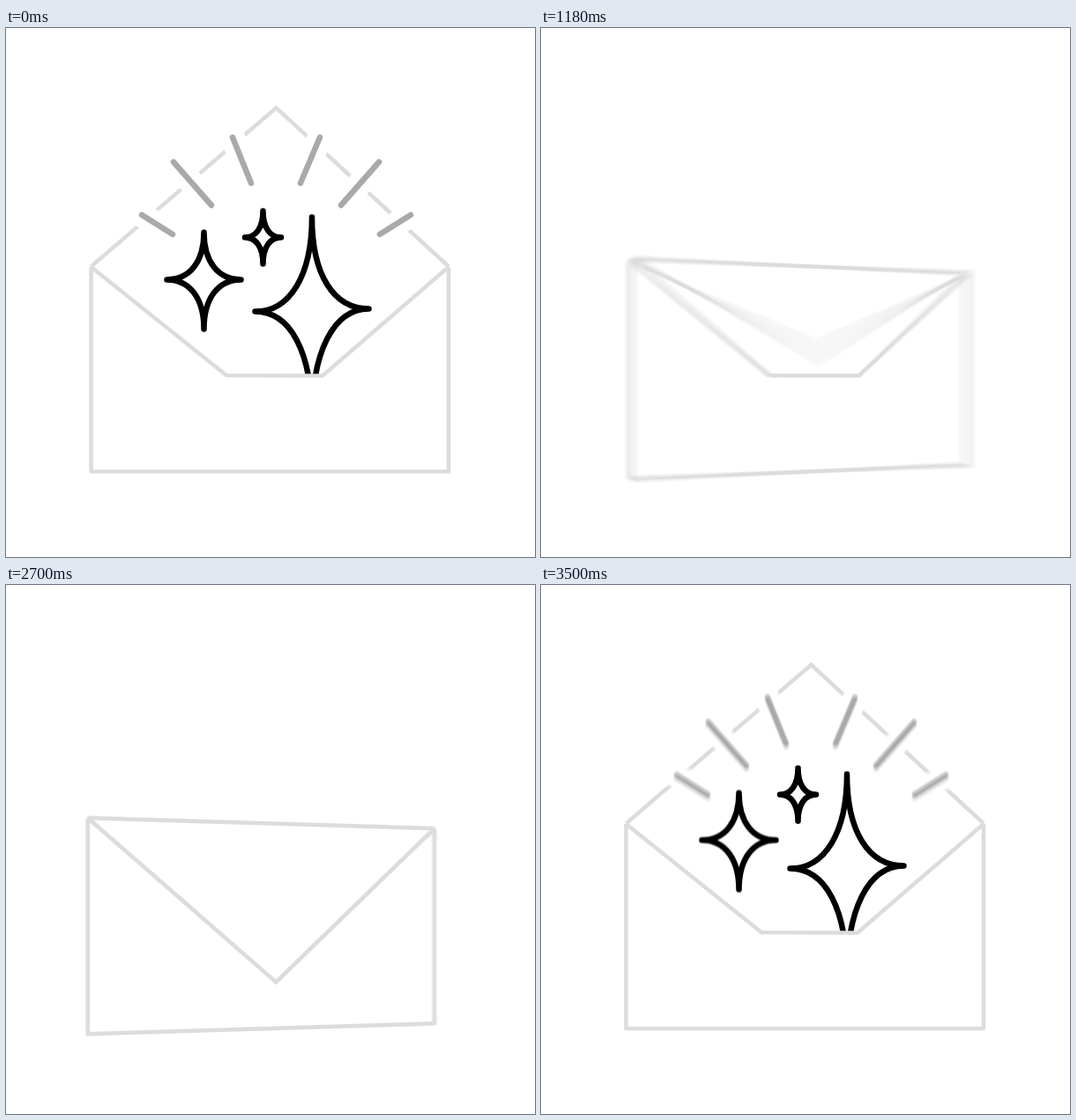
An HTML page with a canvas for the animation above (3.53 s loop, 600 by 600 pixels).

```html
<!DOCTYPE html>
<html lang="en">
<head>
<meta charset="utf-8">
<title>Envelope</title>
<style>
  html, body { margin: 0; width: 100%; height: 100%; overflow: hidden; background: #fff; }
  canvas { display: block; width: 600px; height: 600px; }
</style>
</head>
<body>
<canvas id="stage" width="600" height="600"></canvas>
<script>
const LOOP = 3530, SIZE = 600, SHUTTER = 15, SAMPLES = 10;
const GREY = '#dcdcdc', RAY = '#a9a9a9';
const DEPTH = 1020, EYE = { x: 300, y: 387 };
const FLAP = { hinge: 270.5, length: 180, tip: 306.5 };
const POCKET = [[96.5, 271], [250, 394], [359, 394.5], [502, 271]];
const RAYS = [
  [257, 124, 278, 176], [356, 124, 334, 176],
  [190, 152, 233, 201], [423, 152, 380, 201],
  [154, 212, 189, 234], [459, 212, 424, 234]
];
const STARS = [
  { x: 224.5, y: 282.5, w: 42, up: 53.5, down: 56, tilt: 0, pulse: .1, rise: [3205, 3622] },
  { x: 291.5, y: 237.5, w: 20.5, up: 30, down: 30, tilt: 0, pulse: .08, rise: [3200, 3530] },
  { x: 347, y: 320, w: 64.5, up: 105.5, down: 124, tilt: 1.6, pulse: .05, rise: [3180, 3510] }
];
const RAY_RISE = [3420, 3528], DROP = [760, 960], TRAVEL = 280;
const WORD = 'M171 391C169 410 172 424 184 424C200 424 210 408 213 391' +
  'C216 412 218 435 215 453C212 468 205 470 199 469C188 468 184 455 192 442' +
  'C203 427 228 415 240 404C244 394 250 390 258 390C272 390 279 398 279 411' +
  'C279 425 271 433 258 433C246 433 238 426 238 413C238 402 243 396 246 398' +
  'C252 412 270 414 284 406C293 401 299 396 303 391C299 412 299 434 314 434' +
  'C332 434 343 412 346 391C343 412 345 433 360 434';

const wordPath = new Path2D(WORD);
const ruler = document.createElementNS('http://www.w3.org/2000/svg', 'path');
ruler.setAttribute('d', WORD);
const wordLength = ruler.getTotalLength();

const out = document.getElementById('stage').getContext('2d');
const layer = document.createElement('canvas');
layer.width = layer.height = SIZE;
const c = layer.getContext('2d');
c.miterLimit = 2;

const ramp = (t, from, to) => Math.min(1, Math.max(0, (t - from) / (to - from)));
const sine = u => (1 - Math.cos(Math.PI * u)) / 2;
const rad = deg => deg * Math.PI / 180;

// Which side faces the viewer, its turn about the vertical axis and its sideways slide.
function pose(t) {
  if (t < 1135) return { front: false, turn: 0, slide: 0 };
  if (t < 1190) {
    const turn = .0095 * (t - 1135) ** 2;
    return { front: false, turn, slide: turn * .32 };
  }
  if (t < 2550) return { front: true, turn: -25 * (1 - ramp(t, 1190, 1500)) ** 3, slide: 0 };
  if (t < 2640) return { front: true, turn: -25 * ramp(t, 2550, 2640) ** 2, slide: 0 };
  return { front: false, turn: 25 * (1 - ramp(t, 2640, 2907)) ** 2, slide: 0 };
}

// 0 is shut, 180 is fully open.
function flapAngle(t) {
  return t < 2000 ? 180 * (1 - sine(ramp(t, 950, 1320))) : 180 * sine(ramp(t, 2800, 3300));
}

// How far a part is below its resting place; rising may settle after the loop restarts.
function shift(t, [from, to]) {
  const rising = t < 2000 ? t + LOOP : t;
  const drop = t < 2000 ? ramp(t, ...DROP) ** 2 : 0;
  return TRAVEL * ((1 - ramp(rising, from, to)) ** 3 + drop);
}

function project(turn, x, y, z = 0) {
  const a = rad(turn), dx = x - EYE.x;
  const scale = DEPTH / (DEPTH - (z * Math.cos(a) - dx * Math.sin(a)));
  return [
    EYE.x + (dx * Math.cos(a) + z * Math.sin(a)) * scale,
    EYE.y + (y - EYE.y) * scale
  ];
}

function trace(points, closed) {
  c.beginPath();
  points.forEach(p => c.lineTo(...p));
  if (closed) c.closePath();
}

function pen(color, width, cap = 'butt', join = 'miter') {
  c.strokeStyle = color;
  c.lineWidth = width;
  c.lineCap = cap;
  c.lineJoin = join;
}

// Draws a small flat part with the local slope of the turned envelope.
function placed(turn, x, y, draw) {
  const o = project(turn, x, y), h = project(turn, x + 1, y), v = project(turn, x, y + 1);
  const [a, b, d, e] = [h[0] - o[0], h[1] - o[1], v[0] - o[0], v[1] - o[1]];
  c.save();
  c.transform(a, b, d, e, o[0] - a * x - d * y, o[1] - b * x - e * y);
  draw();
  c.restore();
}

function drawStar(s, t) {
  const scale = t < 2000 ? 1 + s.pulse * Math.sin(2 * Math.PI * Math.min(t, 800) / 800) : 1;
  const { w, up, down, tilt } = s, k = .38;
  c.save();
  c.translate(s.x, s.y + shift(t, s.rise));
  c.scale(scale, scale);
  pen('#000', 6.5 / scale, 'round', 'round');
  c.beginPath();
  c.moveTo(0, -up);
  c.bezierCurveTo(0, -up * k, w * k, -tilt, w, -tilt);
  c.bezierCurveTo(w * k, -tilt, 0, down * k, 0, down);
  c.bezierCurveTo(0, down * k, -w * k, tilt, -w, tilt);
  c.bezierCurveTo(-w * k, tilt, 0, -up * k, 0, -up);
  c.closePath();
  c.stroke();
  c.restore();
}

function drawContents(t) {
  if (t > DROP[1] && t < 3180) return;
  c.save();
  trace([[0, 0], [0, 271], ...POCKET, [SIZE, 271], [SIZE, 0]], true);
  c.clip();
  const dy = shift(t, RAY_RISE);
  for (const [color, width] of [['#fff', 28], [RAY, 6.5]]) {
    pen(color, width, 'round');
    for (const [x1, y1, x2, y2] of RAYS) {
      trace([[x1, y1 + dy], [x2, y2 + dy]]);
      c.stroke();
    }
  }
  STARS.forEach(s => drawStar(s, t));
  c.restore();
}

function drawBack(t, turn) {
  const at = p => project(turn, ...p);
  const a = rad(flapAngle(t)), open = flapAngle(t) > 90;
  // The flap is flattened onto the envelope before the envelope turns.
  const tip = project(0, FLAP.tip,
    FLAP.hinge + FLAP.length * Math.cos(a), FLAP.length * Math.sin(a));
  const flap = [[96.5, FLAP.hinge], tip, [502, FLAP.hinge]].map(at);
  const drawFlap = () => {
    pen(GREY, 4.5);
    c.fillStyle = '#fff';
    trace(flap, !open);
    c.fill();
    c.stroke();
  };
  if (open) {
    drawFlap();
    drawContents(t);
  }
  pen(GREY, 4.5, 'butt', 'round');
  trace([[96.5, 271], [96.5, 503], [502, 503], [502, 271]].map(at));
  c.stroke();
  trace(POCKET.map(at));
  c.stroke();
  if (!open) drawFlap();
}

function drawFront(t, turn) {
  pen(GREY, 4.5);
  trace([[96, 271], [504, 271], [504, 503], [96, 503]].map(p => project(turn, ...p)), true);
  c.stroke();

  placed(turn, 178, 316, () => {
    c.fillStyle = '#000';
    c.fillRect(128, 305.5, 63, 4.5);
    c.fillRect(128, 321.8, 101, 4.5);
  });

  placed(turn, 432, 337, () => {
    pen('#000', 4);
    c.strokeRect(422.5, 308, 49.5, 59);
    pen('#000', 4.5, 'round', 'round');
    for (const y of [324.5, 341]) {
      c.beginPath();
      for (let x = 393; x <= 462; x++) c.lineTo(x, y + 4.3 * Math.cos((x - 393) * 2 * Math.PI / 23));
      c.stroke();
    }
  });

  placed(turn, 194, 363, () => {
    c.fillStyle = '#000';
    c.font = '800 24px Inter, sans-serif';
    c.letterSpacing = '3px';
    c.fillText('TO:', 167.5, 372);
  });

  const written = ramp(t, 1640, 1800);
  if (written > 0) placed(turn, 265, 430, () => {
    pen('#000', 6.3, 'round', 'round');
    if (written < 1) c.setLineDash([wordLength * written, wordLength * 2]);
    c.stroke(wordPath);
  });
}

function drawScene(t) {
  const { front, turn, slide } = pose(t);
  c.fillStyle = '#fff';
  c.fillRect(0, 0, SIZE, SIZE);
  c.save();
  c.translate(slide, 0);
  (front ? drawFront : drawBack)(t, turn);
  c.restore();
}

// Averages several moments to give fast parts their motion blur.
function render(t) {
  const fast = (t > 770 && t < 1500) || t > 2540;
  const count = fast ? SAMPLES : 1;
  for (let i = 0; i < count; i++) {
    const offset = count > 1 ? SHUTTER * ((i + .5) / count - .5) : 0;
    drawScene(Math.min(LOOP, t + offset));
    out.globalAlpha = 1 / (i + 1);
    out.drawImage(layer, 0, 0);
  }
}

const start = performance.now();
function tick() {
  render((performance.now() - start) % LOOP);
  requestAnimationFrame(tick);
}
tick();
</script>
</body>
</html>
```
